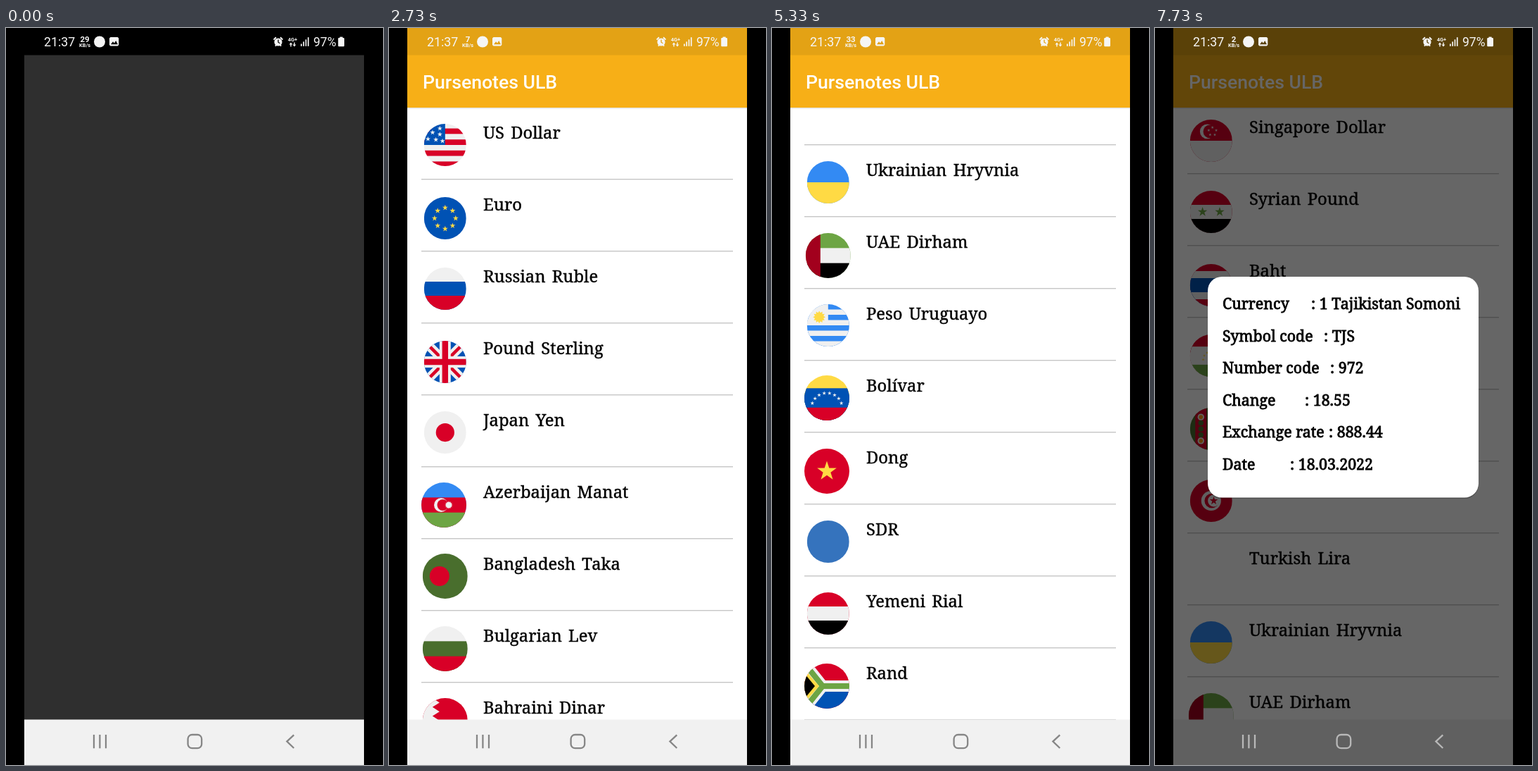
These frames come from a looping animation (536 by 1046 pixels, 8000 ms). An HTML page:

```html
<!DOCTYPE html>
<html lang="en">
<head>
<meta charset="utf-8">
<title>Currency list</title>
<style>
html, body { margin: 0; width: 100%; height: 100%; overflow: hidden; background: #000; }
svg { display: block; width: 100vw; height: 100vh; }
text { white-space: pre; }
.sans { font-family: Roboto, sans-serif; }
.serif { font-family: "Noto Serif", serif; fill: #000; stroke: #000; }
.row { font-size: 23.8px; word-spacing: 3px; stroke-width: .4px; }
.info { font-size: 21.4px; stroke-width: .8px; }
</style>
</head>
<body>
<svg id="stage" viewBox="0 0 536 1046"></svg>
<script>
const LOOP = 8000, PITCH = 102, TOP = 113, END = 6781, REST = 6128;

const INK = {
  r: '#d80027', w: '#f0f0f0', b: '#0052b4', g: '#6da544', y: '#ffda44', k: '#000',
  R: '#a2001d', G: '#496e2d', s: '#338af3', o: '#ff9811', m: '#3573bd'
};

// name | size class and centre height | flag parts, drawn in a disc of radius 32
const ROWS = `US Dollar|n53|hw #r-32,-25,64,8.3 #r-32,-8.3,64,8.3 #r-32,8.3,64,8.3 #r-32,25,64,8 #b-32,-32,32,32 *w4,-8,-25,-19,-19,-8,-16,-26,-9,-14,-8,-4,-6
Euro|n55|hb @y8,16,4.5
Russian Ruble|n53|hwbr
Pound Sterling|n55|hb /w14 /r5 +w17 +r9
Japan Yen|n53|hw or0,0,14
Azerbaijan Manat|w54|hsrg ow-4,0,10 or-1.5,0,8 Sw5.5,7,0
Bangladesh Taka|x53|hG or-8,0,14
Bulgarian Lev|x54|hwGr
Bahraini Dinar|x54|hr ~w-18,-8,5
Brunei Dollar||hy /w10 or0,0,10
Brazilian Real||hg oy0,0,22 ob0,0,12
Belarusian Ruble||hrrg
Canadian Dollar||vrwwr Sr11,0,0
Swiss Franc||hr +w11
Yuan Renminbi||hr *y9,-13,-8
Cuban Peso||hbwbwb <r0,32 *w8,-18,0
Czech Koruna||hwr <b0,32
Danish Krone||hr +w9,-10
Algerian Dinar||vgw or0,0,12 ow4,0,10 *r6,5,0
Egyptian Pound||hrwk oo0,0,6
Afghani||vkrg ow0,0,7
Argentine Peso||hsws Sy7,0,0
Georgian Lari|w53|hw +r8 %r14.5,13,4.5
Hong Kong Dollar|x54|hr &w9.5
Hungarian Forint|w55|hrwg
Rupiah|w52|hRw
New Israeli Sheqel|w52|hw #b-32,-25,64,9 #b-32,16,64,9 !b12
Indian Rupee|n53|howg ob0,0,11.5 ow0,0,8 lb2,-8,0,8,0 lb2,-4,-7,4,7 lb2,-4,7,4,-7 ob0,0,4
Iraqi Dinar|w52|hRwk lG3.5,-21,7,-5,7,-5,0,-15,0,-15,-5,-9,-5 lG3.5,-2,7,6,7,6,-7 lG3.5,6,7,13,7,13,-7 lG3.5,18,-7,18,9
Iranian Rial|n54|hgwr dw3,-32,-13,32,-13 dw3,-32,15,32,15 lr4,-9,-8,-8,2,-4,7,4,7,8,2,9,-8 lr4,0,-9,0,8
Iceland Krona|w54|hb +w17,-11.5 +r9,-11.5
Jordanian Dinar||hkwg <r0,32 *w5,-20,0
Australian Dollar||hb *w8,-14,12 *w5,14,-12,18,2,12,14
Som||hr Sy14,0,0
Riel||hbrrb ow0,0,8
Won||hw or0,0,13 ob0,5,8
Kuwaiti Dinar||hgwr #k-32,-32,18,64
Tenge||hs Sy14,0,0
Kip||hrbbr ow0,0,10
Lebanese Pound||hrwwr og0,0,9
Libyan Dinar||hrkkg ow-2,0,7 ok1,0,6
Moroccan Dirham||hr *G14,0,0
Moldovan Leu||vbyr oR0,0,8
Kyat||hygr *w17,0,0
Tugrik||vrbr oy-20,0,5
Mexican Peso||vgwr oG0,0,6
Malaysian Ringgit||hrwrwrwrw #b-32,-32,32,32 oy-12,-12,9
Norwegian Krone||hr +w14,-10 +b7,-10
New Zealand Dollar||hb *r6,14,-12,18,2,12,14
Rial Omani||hwrg #r-32,-32,20,64
Philippine Peso||hbr <w0,32 Sy7,-18,0
Pakistan Rupee||hG #w-32,-32,18,64 ow5,0,12 oG8,-3,10
Zloty||hwr
Qatari Rial||hR ~w-14,-4,7
Romanian Leu||vbyr
Serbian Dinar||hrbw or-8,0,8
Armenian Dram||hrbo
Saudi Riyal||hG #w-16,-8,32,7 #w-14,7,28,3
Sudanese Pound||hrwk <g-8,26
Swedish Krona||hb +y10,-10
Singapore Dollar|n55|hrw ow-6,-14,11 or-2,-14,10 @w5,6,2.3,2,-14
Syrian Pound|n54|hrwk *g7.5,-13,0,13,0
Baht|n56|hrwbbwr
Tajikistan Somoni|n54|hrrwwwgg @y7,12,2.2,0,6,180 #y-5,4,10,5
Turkmenistan New Manat|n56|hG #r-24,-32,17,64 @o2,18,0 ow-15.5,-18,5 oo-15.5,-18,3 oG-15.5,-9,4 oG-15.5,0,4 oG-15.5,9,4 ow-15.5,18,5 oo-15.5,18,3 ow9,-10,10 oG6,-12,9.5 *w2.8,0,-15,6,-16,-2,-9,4,-10,9,-12
Tunisian Dinar|n56|hr ow0,0,15 or1,0,11 ow4,0,9 *r6.5,4,0
Turkish Lira||
Ukrainian Hryvnia|n53|hsy
UAE Dirham|x55|hgwk #R-32,-32,21,64
Peso Uruguayo|n52|hswswswsw #w-32,-32,32,32 Sy9.5,-13.5,-12.5
Bolívar|w53|hyybbbrr @w8,22,3,0,15,140
Dong|w55|hr *y14.5,0,0
SDR|n53|hm
Yemeni Rial|n53|hrwk
Rand|w54|hrb lw16,-30,-30,-6,0,34,0 lw16,-30,30,-6,0 lg8,-30,-30,-6,0,34,0 lg8,-30,30,-6,0 <y-11,24 <k-17,18`.split('\n');

const clamp = x => Math.min(1, Math.max(0, x));
const ramp = (t, a, b) => clamp((t - a) / (b - a));
const range = n => [...Array(n).keys()];
const rect = (x, y, w, h, fill, more = '') =>
  `<rect x="${x}" y="${y}" width="${w}" height="${h}" fill="${fill}" ${more}/>`;
const disc = (x, y, r, fill) => `<circle cx="${x}" cy="${y}" r="${r}" fill="${fill}"/>`;
const poly = (pts, fill, more = '') => `<polygon points="${pts}" fill="${fill}" ${more}/>`;
const line = (pts, color, w, more = '') =>
  `<polyline points="${pts}" fill="none" stroke="${color}" stroke-width="${w}" ${more}/>`;
const text = (x, y, s, more) => `<text x="${x}" y="${y}" ${more}>${s}</text>`;
const polar = (x, y, r, a) => [x + r * Math.sin(a), y - r * Math.cos(a)].map(v => v.toFixed(2));

function star(x, y, r, fill, n = 5, inner = .39) {
  const pts = range(2 * n).map(i => polar(x, y, i % 2 ? r * inner : r, i * Math.PI / n));
  return poly(pts.join(' '), fill);
}

function pairs(list) {
  return range(list.length >> 1).map(i => [list[2 * i], list[2 * i + 1]]);
}

function cross(x, y, size, w, c) {
  return rect(x - w / 2, y - size / 2, w, size, c) + rect(x - size / 2, y - w / 2, size, w, c);
}

function stripes(letters, vertical) {
  const step = 64 / letters.length;
  return [...letters].map((l, i) => {
    const p = -32 + i * step, len = 64 - i * step;
    return vertical ? rect(p, -32, len, 64, INK[l]) : rect(-32, p, 64, len, INK[l]);
  }).join('');
}

const PARTS = {
  '#': (c, [x, y, w, h]) => rect(x, y, w, h, c),
  'o': (c, [x, y, r]) => disc(x, y, r, c),
  '*': (c, [r, ...at]) => pairs(at).map(([x, y]) => star(x, y, r, c)).join(''),
  'S': (c, [r, x, y]) => star(x, y, r, c, 12, .7),
  '@': (c, [n, ring, r, x = 0, y = 0, span = 360]) => range(n).map(i => {
    const deg = span === 360 ? i * 360 / n : -span / 2 + i * span / (n - 1);
    return star(...polar(x, y, ring, deg * Math.PI / 180).map(Number), r, c);
  }).join(''),
  '+': (c, [w, x = 0]) => rect(x - w / 2, -32, w, 64, c) + rect(-32, -w / 2, 64, w, c),
  '/': (c, [w]) => line('-32,-32 32,32', c, w) + line('-32,32 32,-32', c, w),
  '%': (c, [d, size, w]) =>
    pairs([-d, -d, d, -d, -d, d, d, d]).map(([x, y]) => cross(x, y, size, w, c)).join(''),
  '<': (c, [x, h]) => poly(`-32,${-h} ${x},0 -32,${h}`, c),
  '~': (c, [a, b, n]) => poly('-32,-32 ' + range(2 * n + 1).map(i =>
    [i % 2 ? b : a, -32 + i * 32 / n]).join(' ') + ' -32,32', c),
  '&': (c, [d]) => range(5).map(i =>
    `<g transform="rotate(${i * 72 + 12})"><ellipse cy="${-d}" rx="3.8" ry="7.4" fill="${c}" transform="rotate(24 0 ${-d})"/></g>`).join(''),
  '!': (c, [r]) => [0, 1].map(i => poly(range(3).map(k =>
    polar(0, 0, r, (k * 2 + i) * Math.PI / 3)).join(' '), 'none', `stroke="${c}" stroke-width="2.6"`)).join(''),
  'l': (c, [w, ...pts]) => line(pts, c, w),
  'd': (c, [w, ...pts]) => line(pts, c, w, 'stroke-dasharray="3.5 3.5"')
};

function part(token) {
  const kind = token[0];
  if (kind === 'h' || kind === 'v') return stripes(token.slice(1), kind === 'v');
  return PARTS[kind](INK[token[1]], token.slice(2).split(',').map(Number));
}

function flag(place, spec, y) {
  const [kind, dy] = place ? [place[0], +place.slice(1)] : ['n', 54];
  const x = kind === 'w' ? 78 : 79.8, r = kind === 'n' ? 30 : 32;
  return `<g class="flag" transform="translate(${x} ${y + dy}) scale(${r / 32})">` +
    `<g clip-path="url(#round)">${spec.split(' ').filter(Boolean).map(part).join('')}</g></g>`;
}

function row(entry, i) {
  const [name, place, spec] = entry.split('|'), y = TOP + i * PITCH;
  return text(134, y + 44, name, 'class="serif row"') + flag(place, spec, y) +
    rect(46, y + 101, 443, 1.4, '#c6c6c6');
}

function statusBar() {
  const c = '#f5f5f5', small = 'class="sans" font-weight="700" text-anchor="middle"';
  return `<g fill="${c}">` +
    text(54, 26.3, '21:37', 'class="sans" font-size="17.8"') +
    text(112, 20.2, '', `${small} id="speed" font-size="11.5"`) +
    text(112, 26.6, 'KB/s', `${small} font-size="7.4"`) +
    disc(133, 19.5, 8, c) +
    '<path fill-rule="evenodd" d="M148.5 13h10.3l1.5 1.5v9.6l-1.5 1.5h-10.3l-1.5-1.5v-9.6zM149 23.3h10l-2.8-5.3-2.2 3.6-2-2.3z"/>' +
    '<path fill-rule="evenodd" d="M381.4 20a5.6 5.6 0 1 1 11.2 0a5.6 5.6 0 1 1-11.2 0M386.4 16.6v4l2.8 1.7.6-1-2.1-1.3v-3.4z"/>' +
    line('380.6,16.6 384,13.2', c, 2) + line('390,13.2 393.4,16.6', c, 2) +
    line('382.8,25.6 384.4,24', c, 1.8) + line('391.2,25.6 389.6,24', c, 1.8) +
    text(407.5, 18.9, '4G+', `${small} font-size="7.4"`) +
    poly('405,20.5 407.4,23.4 405.7,23.4 405.7,26.4 404.3,26.4 404.3,23.4 402.6,23.4', c) +
    poly('410,26.5 412.4,23.6 410.7,23.6 410.7,20.6 409.3,20.6 409.3,23.6 407.6,23.6', c) +
    range(4).map(i => rect(419 + i * 3.3, 22.5 - i * 3.1, 1.7, 3.3 + i * 3.1, c)).join('') +
    text(437, 26.3, '97%', 'class="sans" font-size="17.5"') +
    rect(472.2, 14, 8.8, 12.3, c, 'rx="1.2"') + rect(474.5, 12.6, 4.2, 2.4, c) + '</g>';
}

function navIcons() {
  return '<g id="nav" fill="none" stroke-width="2.3">' +
    [125, 133.4, 142].map(x => `<path d="M${x} 1003V1022.3"/>`).join('') +
    '<rect x="258.6" y="1003" width="19.6" height="19.2" rx="6"/>' +
    '<path d="M409.3 1003.3L399.4 1012.6L409.3 1022"/></g>';
}

const LABELS = [['Currency', 222], ['Symbol code', 240], ['Number code', 249],
  ['Change', 213], ['Exchange rate', 247], ['Date', 192]];
const DOLLAR = ['1 US Dollar', 'USD', '840', '241.61', '11571.99', '18.03.2022'];
const SOMONI = ['1 Tajikistan Somoni', 'TJS', '972', '18.55', '888.44', '18.03.2022'];
const SPEEDS = [29, 12, 4, 7, 19, 33, 84, 5, 2];

const dialog = LABELS.map(([label, x], i) => {
  const y = 399 + i * 45.6;
  return text(96, y, label, 'class="serif info"') + text(x, y, '', 'class="serif info value"');
}).join('');

const stage = document.getElementById('stage');
stage.innerHTML = `<defs>
<clipPath id="round"><circle r="32"/></clipPath>
<clipPath id="view"><rect x="26" y="113" width="483" height="869"/></clipPath>
</defs>
${rect(0, 0, 536, 1046, '#000')}
${rect(26, 38.5, 483, 943.5, '#2f2f2f')}
<g id="splash">${rect(26, 38.5, 483, 943.5, '#fff')}
<circle id="coin" r="111.5" fill="#e3a215"/>
${text(268, 794.5, 'Pursenotes', 'id="brand" class="serif" font-size="37.6" stroke-width=".5" text-anchor="middle"')}</g>
<g id="screen">${rect(26, 39, 483, 943, '#fff')}
<g clip-path="url(#view)"><g id="list">${rect(26, 0, 483, 103, '#e4e4e4', 'id="press"')}${ROWS.map(row).join('')}</g></g>
${rect(26, 113, 483, 1.5, '#000', 'opacity=".1"')}
${rect(26, 0, 483, 39, '#e3a215')}${rect(26, 38.5, 483, 74.5, '#f7af17')}
${text(48, 86, 'Pursenotes ULB', 'class="sans" font-size="26.6" font-weight="500" fill="#fff"')}</g>
${rect(26, 981.5, 483, 64.5, '#f1f1f1')}
${rect(26, 0, 483, 1046, '#000', 'id="dim"')}
${navIcons()}${statusBar()}
<g id="dialog">${rect(75, 354.5, 385, 313.5, '#000', 'rx="20" opacity=".25"')}${rect(75, 353, 385, 313.5, '#fff', 'rx="20"')}${dialog}</g>`;

const $ = id => document.getElementById(id);
const set = (el, name, value) => el.setAttribute(name, value);
const flags = [...document.querySelectorAll('.flag')];
const values = [...document.querySelectorAll('.value')];

function scrollAt(t) {
  if (t < 5400) return END * ramp(t, 4266.9, 5266.9);
  return REST + (END - REST) * Math.pow(1 - ramp(t, 5400, 6670), 1.65);
}

function dialogAt(t) {
  return t < 5000 ? ramp(t, 3335, 3635) * (1 - ramp(t, 3865, 4125)) : ramp(t, 6870, 7200);
}

function draw(ms) {
  const t = Math.floor((ms + 5) * .015) / .015;

  set($('splash'), 'opacity', ramp(t, 135, 330));
  const turn = 2 * Math.PI * ramp(t, 200, 1600), c = Math.cos(turn), s = Math.sin(turn);
  set($('coin'), 'cx', 267.5 + 5.5 * c - 3.5 * s);
  set($('coin'), 'cy', 518.5 + 5.5 * s + 3.5 * c);
  set($('brand'), 'opacity', ramp(t, 200, 1000));

  const enter = ramp(t, 1800, 2330);
  set($('screen'), 'opacity', enter * (2 - enter));
  set($('list'), 'visibility', t >= 2460 ? 'visible' : 'hidden');
  set($('list'), 'transform', `translate(0 ${-scrollAt(t)})`);
  flags.forEach((el, i) => set(el, 'opacity', t >= 2530 + i % 3 * 66 ? 1 : 0));

  const first = t > 3195 && t < 3500, second = t > 6795 && t < 7050;
  set($('press'), 'y', TOP + (second ? 63 : 0) * PITCH);
  set($('press'), 'opacity', first || second ? 1 : 0);

  const open = dialogAt(t), k = .9 + .1 * open;
  set($('dim'), 'opacity', .6 * open);
  set($('dialog'), 'opacity', open);
  set($('dialog'), 'transform', `translate(267.5 510) scale(${k}) translate(-267.5 -510)`);
  const shade = Math.round(134 + 50 * open);
  set($('nav'), 'stroke', `rgb(${shade},${shade},${shade})`);
  const info = t < 5000 ? DOLLAR : SOMONI;
  values.forEach((el, i) => { el.textContent = ': ' + info[i]; });

  $('speed').textContent = SPEEDS[Math.max(0, Math.floor((t - 655) / 1010) + 1)];
}

const start = performance.now();
function tick() {
  draw((performance.now() - start) % LOOP);
  requestAnimationFrame(tick);
}
draw(0);
requestAnimationFrame(tick);
</script>
</body>
</html>
```
